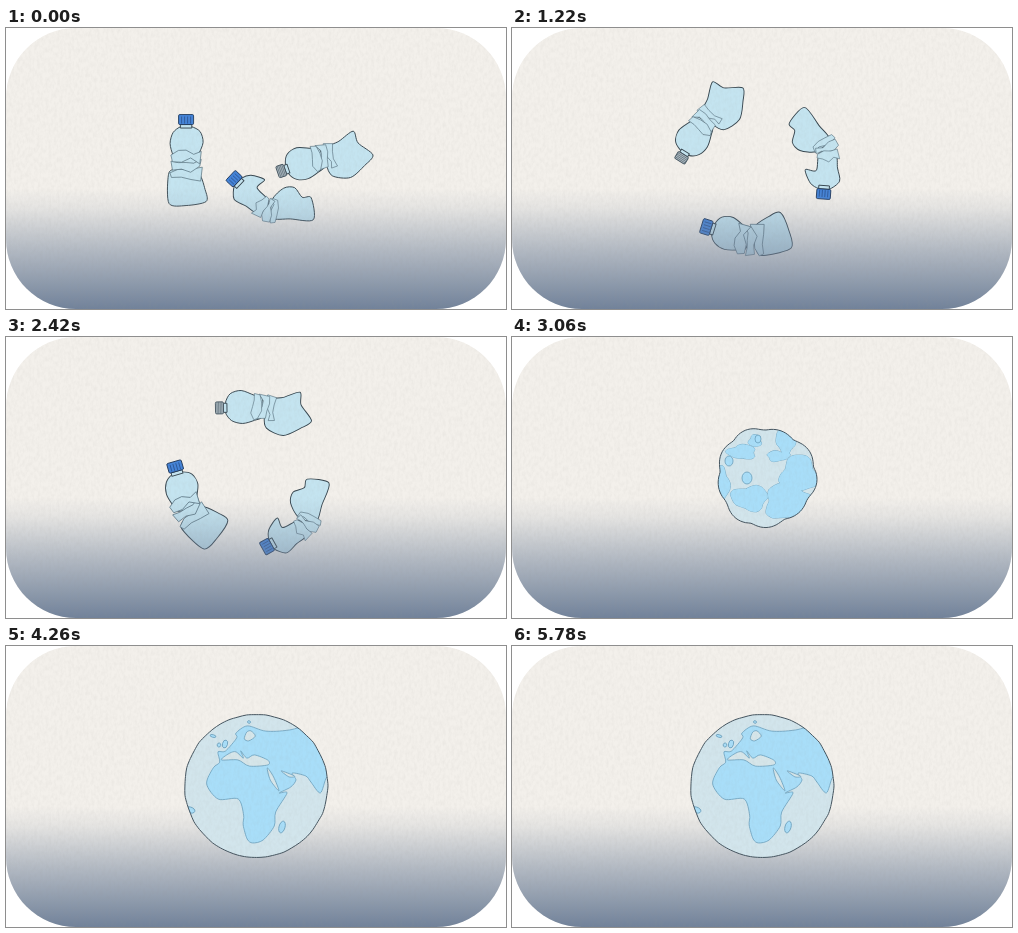
An HTML page that plays this animation: 500x281 px, repeating every 5860 ms.

```html
<!DOCTYPE html>
<html lang="en">
<head>
<meta charset="utf-8">
<title>Bottles to globe</title>
<style>
  html, body { margin: 0; width: 100%; height: 100%; overflow: hidden; background: #fff; }
  svg { display: block; width: 100%; height: 100%; }
  .body, .fold { fill: #c4e4f0; stroke: #37464f; stroke-width: .95; stroke-linejoin: round; }
  .fold { stroke: #57707d; stroke-width: .75; }
  .rib { fill: none; stroke: #244a86; stroke-width: .7; }
  .cap { fill: #4383d8; stroke: #20395c; stroke-width: .9; }
  .grey .cap { fill: #b3c0c8; stroke: #43535e; }
  .grey .rib { stroke: #586973; }
  .sea { fill: #d2e5ec; }
  .land, .fill { fill: #a8def9; }
  .water { fill: #d6e6ea; }
  .land, .water { stroke: #6a9fbc; stroke-width: .8; stroke-linejoin: round; }
  .rim { fill: none; stroke: #43535e; stroke-width: 1; }
</style>
</head>
<body>
<svg viewBox="0 0 500 281" preserveAspectRatio="none">
  <defs>
    <linearGradient id="dusk" x1="0" y1="0" x2="0" y2="1">
      <stop offset=".57" stop-color="#71829a" stop-opacity="0"/>
      <stop offset=".64" stop-color="#71829a" stop-opacity=".11"/>
      <stop offset=".79" stop-color="#71829a" stop-opacity=".5"/>
      <stop offset="1" stop-color="#71829a"/>
    </linearGradient>
    <filter id="paper" x="0" y="0" width="1" height="1">
      <feTurbulence type="fractalNoise" baseFrequency=".35 .2" numOctaves="3" seed="4"/>
      <feColorMatrix values="0 0 0 0 .3  0 0 0 0 .29  0 0 0 0 .27  .15 0 0 0 -.052"/>
    </filter>
    <clipPath id="card"><rect width="500" height="281" rx="70"/></clipPath>
    <clipPath id="disc"><path id="discEdge"/></clipPath>
    <clipPath id="lump"><path id="lumpEdge"/></clipPath>
  </defs>
  <g clip-path="url(#card)">
    <rect width="500" height="281" fill="#f3f0eb"/>
    <g id="bottles"></g>
    <rect width="500" height="281" fill="url(#dusk)"/>
    <g id="ball"></g>
    <g id="globe"></g>
    <rect width="500" height="281" filter="url(#paper)"/>
  </g>
</svg>
<script>
const LOOP = 5860, STEP = 80, HOLD = 500, GLOBE_AT = 3140;
const $ = id => document.getElementById(id);
const mix = (a, b, k) => a + (b - a) * k;
const mod = (a, n) => ((a % n) + n) % n;
const random = i => mod(Math.sin(i * 127.1) * 43758.5, 1);

// Smooth closed curve through [x, y, x, y, ...], with an optional wobble.
function smooth(flat, seed = 0, amp = 0) {
  const pts = [];
  for (let i = 0; i < flat.length; i += 2) {
    pts.push([flat[i] + amp * Math.sin(i * 7.3 + seed * 2.1), flat[i + 1] + amp * Math.sin(i * 4.7 + seed * 2.6 + 1)]);
  }
  const at = i => pts[mod(i, pts.length)];
  return `M${at(0)}` + pts.map((p, i) => {
    const o = at(i - 1), q = at(i + 1), s = at(i + 2);
    return `C${p[0] + (q[0] - o[0]) / 7},${p[1] + (q[1] - o[1]) / 7} ${q[0] - (s[0] - p[0]) / 7},${q[1] - (s[1] - p[1]) / 7} ${q}`;
  }).join('') + 'Z';
}

// Closed outline around a centre, radius given by a function of the angle.
function around(cx, cy, radius, count = 60) {
  const pts = [];
  for (let i = 0; i < count; i++) {
    const a = i * 2 * Math.PI / count, r = radius(a);
    pts.push(cx + r * Math.cos(a), cy + r * Math.sin(a));
  }
  return pts;
}

// ---- bottles: local origin at the waist, cap pointing up ----
const BULB = [5,-39, 14,-34, 17,-23, 12,-10, 9,-2, -9,-2, -13,-10, -16,-22, -13,-33, -5,-39];
const BITTEN = [5,-41, 14,-36, 20,-23, 9,-23, 7,-5, -9,-5, -12,-19, -15,-32, -5,-41];

// Angles in degrees: a on the ring, u and l turn the upper and lower part relative to a.
const BOTTLES = [
  { upper: BULB, lower: [-13,4, -18,12, -17,38, 0,40, 20,36, 19,24, 11,6], cap: [15, 10], fold: .95,
    start: { r: 66, a: 183, u: 177, l: 177 }, ring: { a: 0, u: 191, l: 160 } },
  { upper: BITTEN, lower: [-8,4, -10,22, -12,45, 10,44, 11,35, 21,28, 21,17, 10,5], cap: [14, 10], fold: .78,
    start: { r: 44, a: 69, u: 244, l: 198 }, ring: { a: -113, u: 201, l: 153 } },
  { upper: BULB, lower: [8,3, 14,16, 23,31, 11,35, -2,49, -12,40, -23,25, -20,7, -8,2], cap: [12, 8], fold: .8, grey: true,
    start: { r: 73, a: -10, u: -99, l: -84 }, ring: { a: -233, u: -11, l: 4 } }
];

function capMarkup({ cap: [w, h], grey }) {
  let ribs = '';
  for (let i = 1; i < 5; i++) {
    ribs += grey ? `M${-w / 2},${-41 - h + i * h / 5}h${w}` : `M${-w / 2 + i * w / 5},${-39 - h}v${h - 3}`;
  }
  return `<rect class="body" x="${-w * .38}" y="-41" width="${w * .76}" height="3.5"/>
    <rect class="cap" x="${-w / 2}" y="${-41 - h}" width="${w}" height="${h}" rx="1.3"/>
    <path class="rib" d="${ribs}"/>`;
}

// A jagged crease band, irregular by seed.
function foldPath(seed, y) {
  const pts = [], w = 14 + 4 * random(seed);
  for (let i = 0; i < 5; i++) pts.push([mix(-w, w, i / 4), y - 4 + 9 * (random(seed + i + 1) - .5)]);
  for (let i = 0; i < 4; i++) pts.push([mix(w, -w, i / 3) * .9, y + 5 + 7 * (random(seed + i + 7) - .5)]);
  return `M${pts.join('L')}Z`;
}

BOTTLES.forEach((b, i) => {
  b.el = document.createElementNS('http://www.w3.org/2000/svg', 'g');
  if (b.grey) b.el.setAttribute('class', 'grey');
  const folds = [8, -1, -10].map((y, j) => `<path class="fold" d="${foldPath(i * 40 + j * 13 + 3, y)}"/>`);
  b.el.innerHTML = `<path class="body" d="${smooth(b.lower)}"/>
    <g><path class="body" d="${smooth(b.upper)}"/>${capMarkup(b)}</g>${folds.join('')}`;
  $('bottles').append(b.el);
});

// The ring turns clockwise, slowly gaining speed.
const ringAngle = n => 311 + (n - 4) * (25.05 + .171 * (n - 15));

function poseBottle({ el, start, ring, fold }, n) {
  const join = Math.min(1, n / 4), pull = Math.max(0, (n - 27) / 5);
  const a = mix(start.a, ringAngle(Math.max(n, 4)) + ring.a, join);
  const r = mix(start.r, 72, join) * (1 - .72 * pull * pull);
  const u = a + mix(start.u, ring.u, join), l = a + mix(start.l, ring.l, join);
  const x = 246 + r * Math.cos(a * Math.PI / 180) + 8 * pull, y = 141 + r * Math.sin(a * Math.PI / 180);
  el.setAttribute('transform', `translate(${x} ${y}) scale(${1 - .25 * pull})`);
  const [low, top, ...folds] = el.children;
  low.setAttribute('transform', `rotate(${l})`);
  top.setAttribute('transform', `rotate(${u})`);
  folds.forEach((f, i) => f.setAttribute('transform', `rotate(${mix(l, u, (i + 1) / 4)}) scale(${fold})`));
}

// ---- crumpled ball ----
const lump = smooth(around(254, 140, a => 47 + 3 * Math.abs(Math.sin(a * 4.5 + 1)) + 1.5 * Math.sin(a * 3 + 2)));
const PATCHES = [[287, 137, 18, 18], [276, 164, 23, 18], [266, 119, 11, 5], [274, 104, 10, 12],
  [238, 161, 18, 12], [230, 115, 14, 7], [243, 104, 6, 6], [209, 147, 8, 17]];
const SPOTS = [[217, 124, 4, 5], [246, 102, 3, 4], [235, 141, 5, 6]];
const patches = PATCHES.map(([x, y, rx, ry], i) =>
  smooth(around(0, 0, a => 1 + .13 * Math.sin(a * 3 + i) + .08 * Math.sin(a * 5 + i * 2), 20)
    .map((v, j) => j % 2 ? y + v * ry : x + v * rx)));
$('lumpEdge').setAttribute('d', lump);
$('ball').innerHTML = `<path class="sea" d="${lump}"/><g clip-path="url(#lump)">` +
  ['land', 'fill'].map(c => patches.map(d => `<path class="${c}" d="${d}"/>`).join('')).join('') +
  SPOTS.map(([x, y, rx, ry]) => `<ellipse class="land" cx="${x}" cy="${y}" rx="${rx}" ry="${ry}"/>`).join('') +
  `</g><path class="rim" d="${lump}"/>`;

// ---- globe ----
const CONTINENT = [207,122, 214,116, 212,106, 219,105, 231,92, 230,87, 241,80, 260,85, 284,84, 330,75, 330,129, 321,131,
  314,147, 305,136, 300,130, 286,127, 290,134, 285,141, 273,147, 281,147, 270,166, 268,180, 257,194, 247,197,
  241,193, 237,179, 238,169, 232,153, 212,153, 201,138];
const ISLANDS = [[219, 98, 2.5, 4], [213, 99, 1.8, 2], [207, 90, 3, 1.3], [243, 76, 1.6, 1.2], [276, 181, 3, 6], [184, 164, 5, 3]];
const WATERS = [
  [215,114, 224,107, 230,106, 237,112, 235,105, 241,112, 248,109, 262,114, 262,119, 243,120, 232,114],
  [261,122, 268,131, 273,145, 264,134],
  [275,125, 289,130, 283,131],
  [238,93, 241,86, 245,85, 249,90, 243,95]
];
const RIM = around(250.2, 140, () => 71.5, 48);

function globeMarkup(pose) {
  const draw = (cls, p) => `<path class="${cls}" d="${smooth(p, pose, .35)}"/>`;
  const island = ([x, y, rx, ry]) => `<ellipse class="land" rx="${rx}" ry="${ry}" transform="translate(${x} ${y}) rotate(${15 + pose})"/>`;
  return draw('sea', RIM) + '<g clip-path="url(#disc)">' + draw('land', CONTINENT) +
    ISLANDS.map(island).join('') + WATERS.map(p => draw('water', p)).join('') + '</g>' + draw('rim', RIM);
}
$('discEdge').setAttribute('d', smooth(RIM));
$('globe').innerHTML = [0, 1, 2].map(i => `<g>${globeMarkup(i)}</g>`).join('');

// Three wobble poses per four steps; the rhythm shifts half a cycle at step 20.
function wobblePose(t) {
  const s = Math.floor((t - GLOBE_AT) / STEP);
  return mod(Math.floor((3 * s + (s < 20 ? 0 : 2)) / 4), 3);
}

const show = (el, on) => { el.style.display = on ? '' : 'none'; };

function render(t) {
  const n = t < HOLD ? 0 : Math.floor((t - HOLD) / STEP) + 1;
  show($('bottles'), n < 33);
  show($('ball'), n === 33);
  show($('globe'), n > 33);
  if (n < 33) BOTTLES.forEach(b => poseBottle(b, n));
  [...$('globe').children].forEach((g, i) => show(g, i === wobblePose(t)));
}

const start = performance.now();
function tick() {
  render((performance.now() - start) % LOOP);
  requestAnimationFrame(tick);
}
tick();
</script>
</body>
</html>
```
